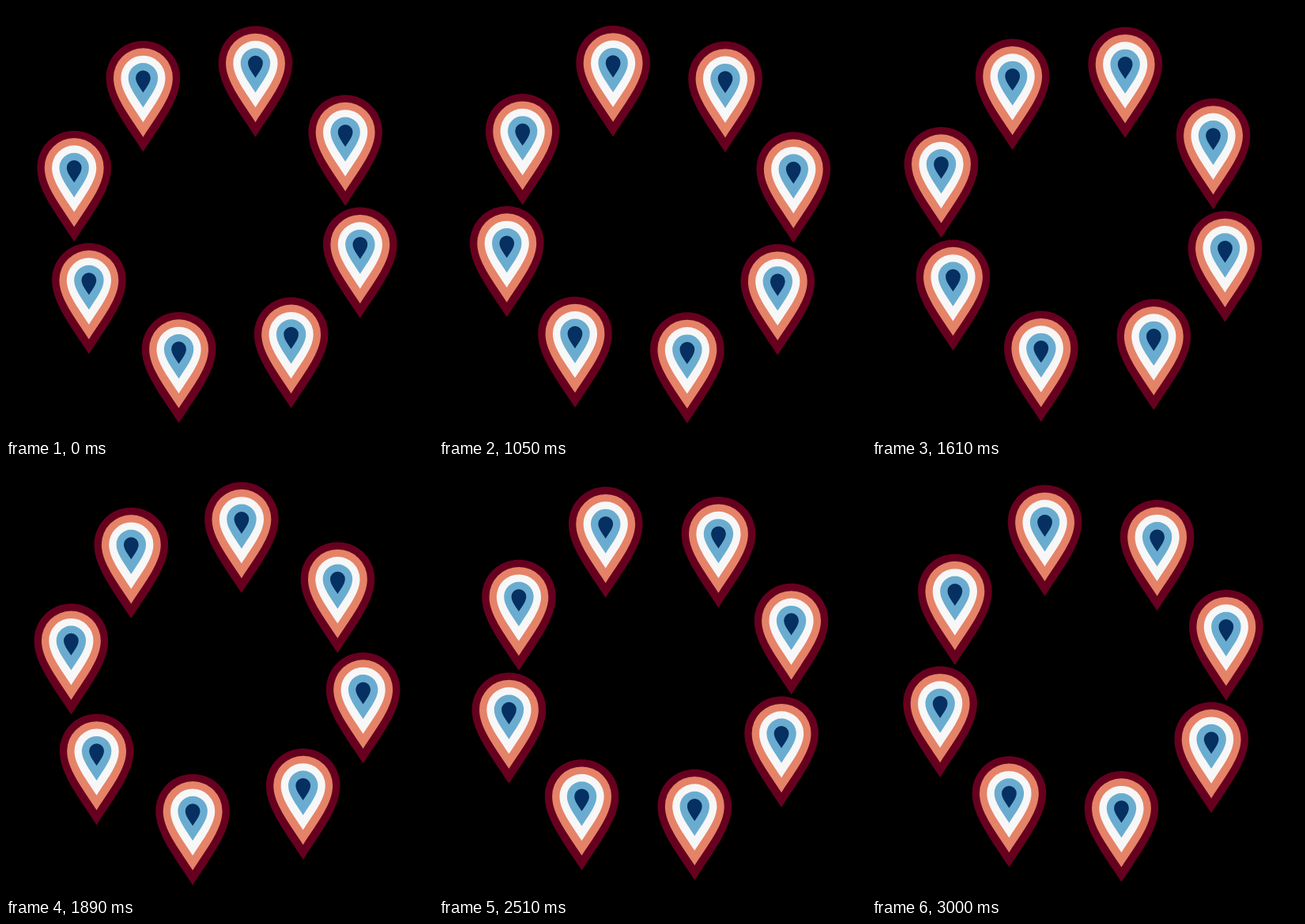
An HTML page without scripts for the animation above (4250 ms loop, 540 px wide and 545 px high).

```html
<!DOCTYPE html>
<html lang="en">
<head>
<meta charset="utf-8">
<title>Ring of pins</title>
<style>
  @property --turn {
    syntax: "<angle>";
    inherits: true;
    initial-value: 15deg;
  }

  html, body {
    margin: 0;
    width: 100%;
    height: 100%;
    overflow: hidden;
    background: #000;
  }

  svg {
    display: block;
    width: 100%;
    height: 100%;
  }

  .ring { animation: turn 4250ms infinite; }

  /* Pins travel round the ring but stay upright. */
  .ring use {
    --a: calc(var(--turn) + var(--i) * 45deg);
    transform: rotate(var(--a)) translateY(-4px) rotate(calc(-1 * var(--a)));
  }

  /* 13deg per tick, with a short first and last tick */
  @keyframes turn {
    0%       { --turn: 15deg;     animation-timing-function: step-end; }
    21.4117% { --turn: 11.5deg;   animation-timing-function: steps(15, end); }
    46.1176% { --turn: -183.5deg; animation-timing-function: step-end; }
    47.5294% { --turn: -196.5deg; animation-timing-function: steps(13, end); }
    68.9411% { --turn: -365.5deg; animation-timing-function: step-end; }
    70.5882%, 100% { --turn: -375deg; }
  }
</style>
</head>
<body>
<svg viewBox="0 0 540 545">
  <defs>
    <path id="drop" d="M-1 0A1 1 0 0 1 1 0C1 .6 .52 1.2 0 2C-.52 1.2 -1 .6 -1 0Z"/>
    <g id="pin">
      <use href="#drop" fill="#67001f"/>
      <use href="#drop" fill="#e58368" transform="scale(.8)"/>
      <use href="#drop" fill="#f7f7f7" transform="scale(.6)"/>
      <use href="#drop" fill="#6aacd0" transform="scale(.4)"/>
      <use href="#drop" fill="#053061" transform="scale(.2)"/>
    </g>
  </defs>
  <g transform="translate(267 252.9) scale(46.8)">
    <g class="ring">
      <use href="#pin" style="--i:0"/>
      <use href="#pin" style="--i:1"/>
      <use href="#pin" style="--i:2"/>
      <use href="#pin" style="--i:3"/>
      <use href="#pin" style="--i:4"/>
      <use href="#pin" style="--i:5"/>
      <use href="#pin" style="--i:6"/>
      <use href="#pin" style="--i:7"/>
    </g>
  </g>
</svg>
</body>
</html>
```
